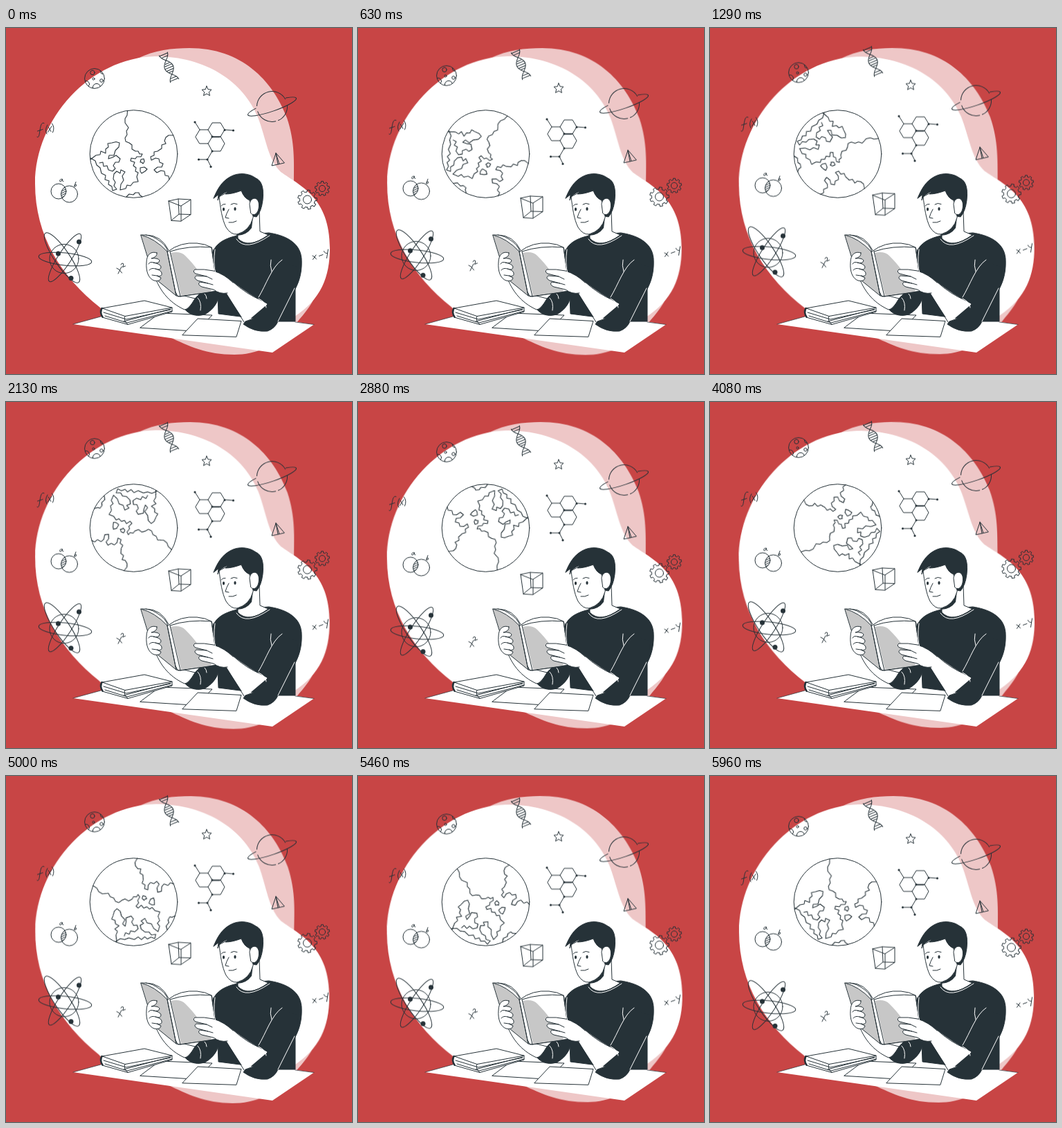
An HTML page without scripts for the animation above (6000 ms loop, 500 by 500 pixels).

```html
<!DOCTYPE html>
<html lang="en">
<head>
<meta charset="utf-8">
<title>Reading science</title>
<style>
html, body { margin: 0; width: 100%; height: 100%; overflow: hidden; background: #c84545; }
svg { display: block; width: 100vw; height: 100vh; }
.line { fill: none; stroke: #263238; stroke-width: 1; stroke-linecap: round; stroke-linejoin: round; }
.white { fill: #fff; }
.grey { fill: #c7c7c7; }
.ink { fill: #263238; }
.lit { fill: none; stroke: #fff; }
.dot { fill: #263238; stroke: none; }
.blob { transform-origin: 255px 250.5px; animation: sway 1.5s linear infinite; }
.land { stroke-width: 1.1; transform-origin: 184.5px 182px; animation: spin 6s linear infinite; }
.icons { animation: float 3s linear infinite; }
@keyframes sway { 25% { transform: rotate(1deg); } 75% { transform: rotate(-1deg); } }
@keyframes spin { to { transform: rotate(360deg); } }
@keyframes float { 50% { transform: translateY(-10px); } }
</style>
</head>
<body>
<svg viewBox="0 0 500 500">
<defs>
  <clipPath id="moon"><circle cx="128" cy="73" r="14.4"/></clipPath>
  <clipPath id="left"><circle cx="76" cy="236" r="11"/></clipPath>
  <clipPath id="right"><circle cx="91.500" cy="240" r="12"/></clipPath>
  <path id="tooth" vector-effect="non-scaling-stroke" d="M-3.76-10.34A11 11 0 0 1-2.1-10.8L-1.95-13.86H1.95L2.1-10.8A11 11 0 0 1 3.76-10.34"/>
  <g id="three"><use href="#tooth"/><use href="#tooth" transform="rotate(40)"/><use href="#tooth" transform="rotate(80)"/></g>
  <g id="gear">
    <use href="#three"/><use href="#three" transform="rotate(120)"/><use href="#three" transform="rotate(240)"/>
    <circle r="6" vector-effect="non-scaling-stroke"/>
  </g>
  <path id="strand" d="M-6.500 0C-6.500 9 6.500 11 6.500 21S-6.500 33-6.500 42"/>
</defs>

<g class="blob">
  <path fill="#eec7c7" d="M190 44C215 32 240 29 265 29C340 29 385 75 406 130C418 165 416 195 416 225L460 300C462 360 452 390 424 421C395 460 360 472 330 472C290 472 265 460 235 446Z"/>
  <path class="white" d="M42 225C42 131 122 43 215 41C290 41 343 78 364 129C376 160 378 189 397 208C425 228 468 245 468 318C468 360 455 392 417 417L320 445C220 450 150 420 136 404C80 360 42 300 42 225Z"/>
</g>

<g class="line">
  <circle class="white" cx="184.500" cy="182" r="63.300"/>
  <g class="land">
    <path d="M175.500 119.500L175 126L172 131L172 137L177 144L174 149L175 154L172 159L173 164L178 166L182 169L182 175L187 178L191 178L193 182L197 182L195 186L189 186L187 189L181 188L180 192L186 194L184 199L188 202L187 207L191 209L189 215L191 222L184 223L180 228L175 227L173 232L165 234L166 226L170 220L168 214L172 208L166 205L165 210L160 207L156 211L155 218L158 223L156 228L160 233L154 235L153 229L148 226L149 221L143 219L144 213L138 210L136 202L131 198L129 192L122 188"/>
    <path d="M122 190L130 184L136 183L137 178L144 181L144 175L148 172L147 167L153 166L159 164.500L164 166L163 172L158 177L156 184L149 184L148 189L154 187L159 184L165 189L163 194L158 194L155 199L158 203L154 207L148 205L146 199L141 200L140 194L135 195"/>
    <path d="M195 190L199 189L200 193L198 196L196 194L194 194Z M194 202L200 201L204 204L201 207L196 210L194 207Z"/>
    <path d="M242 155L235 155L231 158L229 163L231 167L225 169L225 174L219 178L214 179L214 184L209 186L210 191L216 188L221 189L222 194L227 196L225 201L219 201L214 205L218 209L224 206L229 207L230 213L235 214L236 219"/>
    <path d="M174 244L178 240L184 241L187 238L192 238L193 241L197 244"/>
  </g>
</g>

<g class="icons line">
  <circle cx="128" cy="73" r="14.400"/>
  <g clip-path="url(#moon)">
    <circle cx="125" cy="64.500" r="3.200"/><circle cx="126.500" cy="73.500" r="1.600"/><circle cx="138" cy="76" r="2.300"/>
    <circle cx="116" cy="81" r="4.500"/><circle cx="131" cy="86" r="5.600"/><circle cx="140" cy="63" r="3.500"/>
  </g>

  <g transform="translate(227.300 37.500) rotate(-23)">
    <use href="#strand"/><use href="#strand" transform="scale(-1 1)"/>
    <path d="M-6 1H6M-5 4.500H5M-3 15H3M-5 18H5M-6 21.500H6M-5 25H5M-3 28H3M-4 37H4M-6 40.500H6"/>
  </g>

  <!-- handwritten f(x) -->
  <path d="M55 137.500C51 135.500 50 142 49 148C48 155 47.500 159 45 157.500M45.500 149L53 146.500M60 140Q55.500 147 59 153M61 143Q63 145 65 149.500M66 142L60.500 150.500M66.500 138Q71 144 67.500 151"/>

  <g transform="translate(384.500 113.500) rotate(-19)">
    <path d="M-23-5.200A37 6.700 0 1 0 23-5.200"/>
    <path d="M-20.500-8A22 22 0 0 1 21.600-4M21.200 6A22 22 0 0 1 2 21.900M-2 21.900A22 22 0 0 1-22 0"/>
  </g>

  <path d="M290 84L292 88.700L297 89.200L293.300 92.700L294.500 97.700L290 95L285.500 97.700L286.700 92.700L283 89.200L288 88.700Z"/>
  <path d="M390 181L384 199L402 195ZM390 181L393 197M390 181L395 196.500"/>

  <path d="M274 157L280 147H292L298 157L292 167H280ZM292 147L298 137H310L316 147L310 157H298M310 157L316 167L310 178H298L292 167M280 147L273 136M316 147L328 148M298 178L291 190H278M291 190L296 200"/>
  <path stroke-width="1.500" d="M298 157.500H309"/>
  <g class="dot">
    <circle cx="273" cy="136" r="1.600"/><circle cx="328.500" cy="148" r="1.600"/><circle cx="316" cy="147.500" r="1.500"/>
    <circle cx="298" cy="157" r="1.600"/><circle cx="298" cy="178" r="1.500"/><circle cx="291" cy="190" r="1.600"/>
    <circle cx="278.500" cy="190" r="1.600"/><circle cx="296" cy="200.500" r="1.600"/>
  </g>

  <path d="M235 250L249 247L267 248L253 257ZM239 278L250 269L267 269.500L253 279ZM235 250L239 278M249 247L250 269M267 248V269.500M253 257V279"/>

  <circle cx="76" cy="236" r="11"/><circle cx="91.500" cy="240" r="12"/>
  <g clip-path="url(#left)"><path clip-path="url(#right)" d="M78 234L90 228M78 237L90 231M78 240L90 234M78 243L90 237M78 246L90 240M78 249L90 243"/></g>
  <!-- handwritten a, b -->
  <path d="M81.500 218.500C78 217 76.500 222 78.500 222Q80.500 221.500 81.500 218.500Q80.500 222 83 221.500M101 222.500L98.500 229Q101.500 229.500 102 227Q101 225 99 227.500"/>

  <circle cx="84" cy="333.500" r="21"/>
  <ellipse cx="85.500" cy="334" rx="38.500" ry="9" transform="rotate(6 85.500 334)"/>
  <ellipse cx="81" cy="332" rx="43" ry="11" transform="rotate(56 81 332)"/>
  <ellipse cx="85" cy="332" rx="41" ry="9.500" transform="rotate(-57 85 332)"/>
  <g class="dot"><circle cx="105.500" cy="309" r="3.500"/><circle cx="75.500" cy="326" r="3.500"/><circle cx="94" cy="361.500" r="3.500"/></g>

  <!-- handwritten x squared, x - y -->
  <path d="M160 347Q164 348 167.500 354M167 345L162 355M166 342Q167.500 338.500 169.500 340.500Q170.500 342.500 168.500 345.500L172.500 344"/>
  <path d="M443 329Q446 330 448.500 334M448 328L443.500 334.500M452.500 329.500L458 327.500M459.500 322.500Q460.500 326 464 325.500M465.500 320L463.500 332.500"/>

  <use href="#gear" transform="translate(435.500 248) rotate(8)"/>
  <use href="#gear" transform="translate(457 232) scale(.76)"/>
</g>

<g class="line">
  <path class="white" stroke="none" d="M97 428L137 417L240 405L418 424.500L445 428.500L385 469Z"/>
  <path stroke-width=".7" d="M137 417L97 428M418 425L445 428.500"/>
  <path d="M194 433L222 412L298 415L275 438Z"/>
  <path class="white" d="M255 443.500L277 420L340 423.500L333 446Z"/>

  <path class="white" d="M139 405L200 394L240 404V410L176 428.500L139 418Q136 411 139 405Z"/>
  <path d="M139 405L172 416.500L240 404M141 411L174 421L238 407M143 416L175 426L240 409M172 416.500Q169 422 176 428.500M170 424L238 406"/>
  <path stroke-width="2.500" d="M138.500 405Q135 411 139.500 417.500"/>
</g>

<g class="line">
  <!-- torso and sleeves -->
  <path class="ink" d="M334 300C312 305 298 314 296 336L300 380L306 388L307 413L393 424H418V377C425 364 428 350 427 333C425 308 400 299 380 296Z"/>
  <path class="ink" d="M303 370C285 375 280 385 258 406C265 415 278 418 289 413C300 406 306 397 307 388Z"/>
  <path class="lit" d="M277 390Q283 396 281 408M287 384Q290 387 290 391"/>

  <!-- neck, face, ear and hair -->
  <path class="white" d="M335 292V304Q350 320 379 299L367 294L366 264L345 260Z"/>
  <path class="lit" d="M333 305Q346 324 381 300"/>
  <path class="ink" stroke="none" d="M332 299Q352 293 357 274L355 289Q347 300 334 300Z"/>
  <path class="white" d="M308 244C310 260 312 276 318 288Q325 299 334 298Q352 293 357 274L360 245L340 228Z"/>
  <path class="ink" d="M300 246C305 234 311 222 324 215C336 208 352 210 361 217C373 222 372 240 371 249Q369 265 362 273L357 272L352 249Q344 246 340 235Q327 240 317 240L321 236Q308 240 306 249L307 241Z"/>
  <path class="white" d="M352 254C354 243 365 244 365.500 255C366 267 359 273 354 268Z"/>
  <path d="M311 257Q313 254 317 254.500M325 255Q329 252 334 254.500M322 262Q318 269 317 274L322 275M322 281Q328 282 333 279"/>
  <g class="dot"><ellipse cx="314.500" cy="262" rx="1.600" ry="2.400"/><ellipse cx="331" cy="261.500" rx="1.600" ry="2.400"/></g>

  <!-- far arm -->
  <path class="white" d="M212 350C220 379 236 397 258 407Q264 407 273 391Q258 387 246 384L225 360Z"/>

  <!-- book -->
  <path class="white" d="M196 299Q207 298 218 305Q231 313 234 323Q252 309 276 311Q288 312 297 317L306 380L249 388Z"/>
  <path class="grey" d="M195 299Q215 304 233 323L246 387L214 361Z"/>
  <path class="grey" stroke="none" d="M238 325Q252 322 259 329Q271 341 277 350L298 381L253 387Z"/>
  <path d="M202 299Q224 299 235 321M237 323Q263 314 297 317L306 380L252 388L237 323M233 323L246 387L252 388"/>
  <path d="M299 320L304 350"/>

  <!-- far hand -->
  <path class="white" d="M218 325C210 322 203 327 203 339C202 352 206 362 214 365Q223 367 224 361L218 358Q226 360 225 354Q224 350 216 348Q224 351 224 345Q223 341 213 339Q221 341 222 336Q220 332 210 333Q219 331 218 325Z"/>
  <path d="M206 341Q208 337 213 339M207 350Q210 346 216 348M211 357L218 358"/>

  <!-- near arm -->
  <path class="white" stroke="none" d="M318 383L346 426L378 399Q349 384 328 367L306 355Z"/>
  <path d="M318 383L344 425M328 367Q348 385 368 393"/>
  <path class="white" d="M320 383Q309 385 300 378L283 374Q276 371 280 367L292 369L277 365Q270 361 275 358L290 359L274 355Q269 352 273 349Q286 348 300 351Q316 356 328 368"/>
  <path d="M290 359L298 363M292 369L299 371"/>
  <path class="ink" d="M393 424L418 377Q425 360 420 345L394 335Q375 365 365 389Q374 391 378 399Q372 417 346 424L343 428Q359 440 378 438Q389 434 393 424Z"/>
  <path class="lit" d="M399 335C384 345 376 371 365 389M383 335Q381 343 384 352M417 376L393 424M365 391Q376 396 376 404M302 320Q299 340 303 355"/>
</g>
</svg>
</body>
</html>
```
